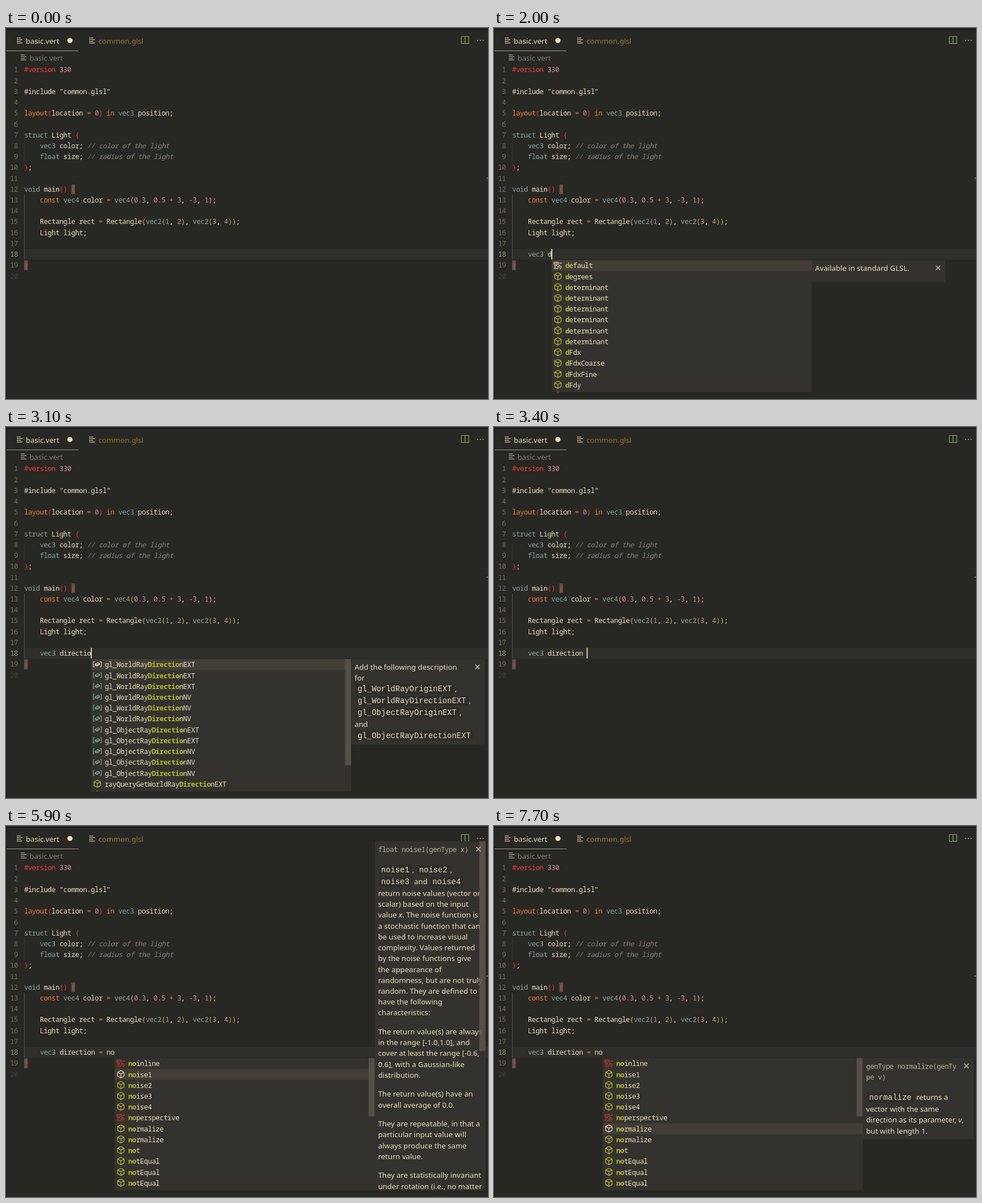
Recreate the animation shown at these times as an HTML page with a canvas. Size 852x657 px, loop 8000 ms.

```html
<!DOCTYPE html>
<html lang="en">
<head>
<meta charset="utf-8">
<title>Shader completion</title>
<style>
html, body { margin: 0; width: 100%; height: 100%; overflow: hidden; background: #272724; }
canvas { display: block; }
</style>
</head>
<body>
<canvas id="stage" width="852" height="657"></canvas>
<script>
const ctx = document.getElementById('stage').getContext('2d');
const LOOP = 8000, CHAR = 6.933, ROW = 19.22, LEFT = 32, INDENT = 60;
const MONO = '"Noto Sans Mono", "DejaVu Sans Mono", monospace';
const SANS = '"Noto Sans", "Open Sans", sans-serif';
const INLINE = '"Liberation Mono", monospace';
const C = {
  bg: '#272724', line: '#2e2e2a', panel: '#33322e', pick: '#423e37', bar: '#584f46', chip: '#2d2c29',
  f: '#ebdbb2', r: '#f63a2c', p: '#d3869b', o: '#f57b2a', b: '#83a598', c: '#8a7d70',
  y: '#f0b93a', g: '#b8bb26', dim: '#7a6e62', sig: '#bdae93'
};

// Segments are split by "~" and start with a colour key.
const CODE = [
  'r#version ~p330', '', 'f#include "common.glsl"', '',
  'olayout~r(~flocation ~o= ~p0~r) ~oin ~bvec3 ~fposition;', '',
  'bstruct ~fLight ~r{',
  'b    vec3 ~fcolor; ~c// color of the light',
  'b    float ~fsize; ~c// radius of the light',
  'r}~f;', '',
  'bvoid ~fmain~r() {',
  'o    const ~bvec4 ~fcolor ~o= ~bvec4~y(~p0.3~f, ~p0.5 ~o+ ~p3~f, ~p-3~f, ~p1~y)~f;', '',
  'f    Rectangle rect ~o= ~fRectangle~y(~bvec2~g(~p1~f, ~p2~g)~f, ~bvec2~g(~p3~f, ~p4~g)~y)~f;',
  'f    Light light;', '', '', 'r}', ''
];

const many = (n, s) => Array(n).fill(s);
// Entries start with an icon key: k keyword, f function, v variable.
const LISTS = {
  v: ['kvarying', 'kvec2', 'kvec3', 'kvec4', 'kvertices', 'kvoid', 'kvolatile',
      'kbvec2', 'kbvec3', 'kbvec4', 'kdvec2', 'kdvec3', 'kdvec4'],
  vec: ['', 'b', 'd', 'i', 'u'].flatMap(s => [2, 3, 4].map(n => 'k' + s + 'vec' + n)).slice(0, 13),
  d: ['kdefault', 'fdegrees', ...many(6, 'fdeterminant'), 'fdFdx', 'fdFdxCoarse', 'fdFdxFine', 'fdFdy', 'fdFdyCoarse'],
  di: ['kdiscard', ...many(5, 'fdistance'), ...many(3, 'vgl_WorldRayDirectionEXT'),
       ...many(3, 'vgl_WorldRayDirectionNV'), 'vgl_ObjectRayDirectionEXT'],
  dir: [...many(3, 'vgl_WorldRayDirectionEXT'), ...many(3, 'vgl_WorldRayDirectionNV'),
        ...many(2, 'vgl_ObjectRayDirectionEXT'), ...many(3, 'vgl_ObjectRayDirectionNV'),
        'frayQueryGetWorldRayDirectionEXT', 'frayQueryGetObjectRayDirectionEXT'],
  no: ['knoinline', 'fnoise1', 'fnoise2', 'fnoise3', 'fnoise4', 'knoperspective',
       ...many(2, 'fnormalize'), 'fnot', ...many(3, 'fnotEqual')]
};
const THUMB = { dir: 188, no: 103 };

const noise = (type, n) => ({ top: 27, h: 618, thumb: 371, lines: [
  `$${type} noise${n}(genType x)`, '-', '`noise1`, `noise2`,', '`noise3` and `noise4`',
  'return noise values (vector or', 'scalar) based on the input', 'value *x*. The noise function is',
  'a stochastic function that can', 'be used to increase visual', 'complexity. Values returned',
  'by the noise functions give', 'the appearance of', 'randomness, but are not truly',
  'random. They are defined to', 'have the following', 'characteristics:', '',
  'The return value(s) are always', 'in the range [-1.0,1.0], and', 'cover at least the range [-0.6,',
  '0.6], with a Gaussian-like', 'distribution.', '',
  'The return value(s) have an', 'overall average of 0.0.', '',
  'They are repeatable, in that a', 'particular input value will', 'always produce the same', 'return value.', '',
  'They are statistically invariant', 'under rotation (i.e., no matter'] });
const DOCS = {
  std: { top: 411, h: 39, lines: ['Available in standard GLSL.'] },
  future: { top: 411, h: 39, lines: ['Reserved for future use.'] },
  ray: { top: 411, h: 151, lines: ['Add the following description', 'for', '`gl_WorldRayOriginEXT`,',
    '`gl_WorldRayDirectionEXT`,', '`gl_ObjectRayOriginEXT`,', 'and', '`gl_ObjectRayDirectionEXT`'] },
  n1: noise('float', 1), n2: noise('vec2', 2), n3: noise('vec3', 3), n4: noise('vec4', 4),
  norm: { top: 411, h: 144, lines: ['$genType normalize(genTy', '$pe v)', '-', '`normalize` returns a',
    'vector with the same', 'direction as its parameter, *v*,', 'but with length 1.'] }
};

// Time and number of characters typed.
const LINE = 'vec3 direction = no';
const KEYS = [[0, 0], [800, 1], [1000, 2], [1200, 3], [1400, 4], [1700, 5], [1900, 6], [2100, 7], [2300, 8],
  [2500, 9], [2600, 10], [2900, 11], [3000, 12], [3100, 13], [3200, 14], [3400, 15], [3500, 16], [3600, 17],
  [4200, 18], [4300, 19]];
// Time, list, column, selected row, description.
const POPUPS = [[0], [900, 'v', 1, 0, 'std'], [1100, 'v', 2, 0, 'std'], [1300, 'vec', 3, 0, 'std'],
  [1500, 'vec', 4, 0], [1700], [2000, 'd', 6, 0, 'std'], [2200, 'di', 7, 0, 'std'], [2400, 'dir', 8, 0, 'ray'],
  [2500, 'dir', 9, 0, 'ray'], [2700, 'dir', 10, 0, 'ray'], [2900, 'dir', 11, 0, 'ray'],
  [3000, 'dir', 12, 0, 'ray'], [3100, 'dir', 13, 0, 'ray'], [3200],
  [4300, 'no', 19, 0], [4400, 'no', 19, 0, 'future'], [5100, 'no', 19, 1, 'n1'], [6000, 'no', 19, 2, 'n2'],
  [6200, 'no', 19, 3, 'n3'], [6400, 'no', 19, 4, 'n4'], [6600, 'no', 19, 5, 'std'], [6800, 'no', 19, 6, 'norm']];
const CARET = [[0, 0], [200, 1], [4000, 0], [4200, 1], [4700, 0], [5200, 1], [5900, 0],
  [6300, 1], [6800, 0], [7300, 1], [7700, 0]];

const at = (track, t) => track.findLast(step => step[0] <= t);

function rect(x, y, w, h, color) {
  ctx.fillStyle = color;
  ctx.fillRect(x, y, w, h);
}

function text(s, x, y, color, font) {
  ctx.font = font;
  ctx.fillStyle = color;
  ctx.fillText(s, x, y);
  return x + ctx.measureText(s).width;
}

const sans = (s, x, y, color, style = '') => text(s, x, y, color, `${style} 13.15px ${SANS}`);

ctx.font = `500 12.4px ${MONO}`;
const tracking = CHAR - ctx.measureText('0').width + 'px';

function mono(s, x, y, color, style = '500') {
  ctx.letterSpacing = tracking;
  text(s, x, y, color, `${style} 12.4px ${MONO}`);
  ctx.letterSpacing = '0px';
  return x + s.length * CHAR;
}

function path(color, width, ...lines) {
  ctx.strokeStyle = color;
  ctx.lineWidth = width;
  ctx.beginPath();
  for (const [x, y, ...rest] of lines) {
    ctx.moveTo(x, y);
    for (let i = 0; i < rest.length; i += 2) ctx.lineTo(rest[i], rest[i + 1]);
  }
  ctx.stroke();
}

function dot(x, y, r, color) {
  ctx.fillStyle = color;
  ctx.beginPath();
  ctx.arc(x, y, r, 0, 7);
  ctx.fill();
}

function fileIcon(x, y, color) {
  [7, 10, 7, 10].forEach((w, i) => rect(x, y - 5 + i * 3, w, 1.2, color));
}

const ICONS = {
  f(color) {
    path(color, 1.2, [0, -6.5, 5.7, -3.4, 5.7, 3.4, 0, 6.5, -5.7, 3.4, -5.7, -3.4, 0, -6.5],
      [-5.7, -3.4, 0, -0.4, 5.7, -3.4], [0, -0.4, 0, 6.5]);
  },
  k(color) {
    path(color, 1.2, [-7, -5.5, 1, -5.5, 1, -2.5, -7, -2.5, -7, -5.5], [3, -4, 7, -4],
      [-7, 0, -1, 0], [1, 0, 5, 0], [-7, 2.8, -3, 2.8], [-1, 2.8, 7, 2.8], [-7, 5.5, 1, 5.5], [3, 5.5, 6, 5.5]);
  },
  v(color) {
    path(color, 1.1, [-5, -4.5, -7, -4.5, -7, 4.5, -5, 4.5], [5, -4.5, 7, -4.5, 7, 4.5, 5, 4.5],
      [-4, 0, 1, -3, 4, -1.5, 4, 0.5, -1, 3, -4, 1.8, -4, 0, -1, 1, 4, -1.5], [-1, 1, -1, 3]);
  }
};
const TINT = { f: C.g, k: '#d8302a', v: C.b };

function chrome() {
  rect(0, 0, 852, 657, C.bg);
  rect(0, 0, 852, 1.2, '#30302c');
  rect(0, 1.2, 852, 1.6, '#121211');
  rect(0, 2, 1, 655, '#151514');
  fileIcon(19, 22, '#d5c4a1');
  sans('basic.vert', 35, 27.5, C.f);
  dot(113, 22, 4.6, '#f2dfb4');
  fileIcon(147, 22, '#d5c4a1');
  sans('common.glsl', 163.5, 27.5, '#967529');
  rect(1, 40, 127, 1, '#a89984');
  fileIcon(26, 52, '#b5a78c');
  sans('basic.vert', 41.5, 57.5, '#857a6b');
  path('#86b35f', 1.2, [805, 15, 818, 15, 818, 27.5, 805, 27.5, 805, 15], [811.5, 15, 811.5, 27.5]);
  for (let i = 0; i < 3; i++) dot(833.5 + i * 5, 22, 1.1, '#8ca868');
  rect(849, 265, 3, 1.5, '#8a8778');
}

function editor() {
  rect(LEFT, 391, 820, 19.5, C.line);
  rect(LEFT, 199, 1, 38, '#32312d');
  rect(LEFT, 295, 1, 115, '#5a524a');
  rect(115.5, 277, 6.5, 17, '#5e5248');
  rect(32, 411.5, 6.5, 17.5, '#5e5248');
  CODE.forEach((line, i) => {
    const y = 78.4 + i * ROW, n = String(i + 1);
    mono(n, 21 - n.length * CHAR, y, i === 17 ? '#a2947f' : i === 19 ? '#46423b' : C.dim);
    let x = LEFT;
    for (const part of line ? line.split('~') : [])
      x = mono(part.slice(1), x, y, C[part[0]], part[0] === 'c' ? 'italic 400' : '500');
  });
}

function typing(typed, caret) {
  let x = INDENT;
  for (const part of typed.split(/(vec3|=)/))
    x = mono(part, x, 405.1, part === 'vec3' ? C.b : part === '=' ? C.o : C.f);
  if (caret) rect(x - 0.3, 391, 1.8, 19, '#f0dfb5');
}

function richLine(line, x, y) {
  if (line[0] === '$') return mono(line.slice(1), x, y, C.sig);
  for (const part of line.split(/(`[^`]*`|\*[^*]*\*)/)) {
    const body = part.slice(1, -1);
    if (part[0] === '`') {
      const font = `13.9px ${INLINE}`;
      ctx.font = font;
      rect(x + 2, y - 13, ctx.measureText(body).width + 7, 17, C.chip);
      x = text(body, x + 5.3, y, C.f, font) + 5;
    } else if (part[0] === '*') x = sans(body, x, y, C.f, 'italic');
    else x = sans(part, x, y, C.f);
  }
}

function clipped(x, y, w, h, draw) {
  ctx.save();
  ctx.beginPath();
  ctx.rect(x, y, w, h);
  ctx.clip();
  rect(x, y, w, h, C.panel);
  draw();
  ctx.restore();
}

function description({ top, h, lines, thumb }, x) {
  const right = Math.min(x + 236, 848);
  clipped(x, top, right - x, h, () => {
    let y = top + 19;
    for (const line of lines) {
      if (line.length > 1) richLine(line, x + 5.7, y);
      y += line === '' ? 14.3 : line === '-' ? 16.8 : line.includes('`') ? 21 : ROW;
    }
    if (thumb) {
      ctx.globalAlpha = 0.8;
      rect(right - 11.5, top + 0.5, 11, thumb, '#61574d');
      ctx.globalAlpha = 1;
    }
    const cx = right - 13, cy = top + 13.8;
    path(C.f, 1.2, [cx - 4, cy - 4, cx + 4, cy + 4], [cx + 4, cy - 4, cx - 4, cy + 4]);
  });
}

function popup([, name, col, picked, doc], typed) {
  if (!name) return;
  const x = INDENT + col * CHAR + 0.3, word = typed.split(' ').pop();
  clipped(x, 411, 460, 234, () => {
    LISTS[name].forEach((entry, i) => {
      const label = entry.slice(1), y = 420.8 + i * ROW;
      if (i === picked) rect(x, y - 9.6, 460, ROW, C.pick);
      ctx.save();
      ctx.translate(x + 11, y - 0.5);
      ICONS[entry[0]](i === picked ? C.f : TINT[entry[0]]);
      ctx.restore();
      const from = Math.max(0, label.toLowerCase().indexOf(word));
      const to = label.toLowerCase().includes(word) ? from + word.length : from;
      let tx = mono(label.slice(0, from), x + 24, y + 4.5, C.f);
      tx = mono(label.slice(from, to), tx, y + 4.5, C.g, 'bold');
      mono(label.slice(to), tx, y + 4.5, C.f);
    });
    if (THUMB[name]) rect(x + 449, 411, 10.5, THUMB[name], C.bar);
  });
  if (doc) description(DOCS[doc], x + 460);
}

function frame(now) {
  const t = now % LOOP, typed = LINE.slice(0, at(KEYS, t)[1]);
  chrome();
  editor();
  typing(typed, at(CARET, t)[1]);
  popup(at(POPUPS, t), typed);
}

const start = performance.now();
(function tick() {
  frame(performance.now() - start);
  requestAnimationFrame(tick);
})();
</script>
</body>
</html>
```
